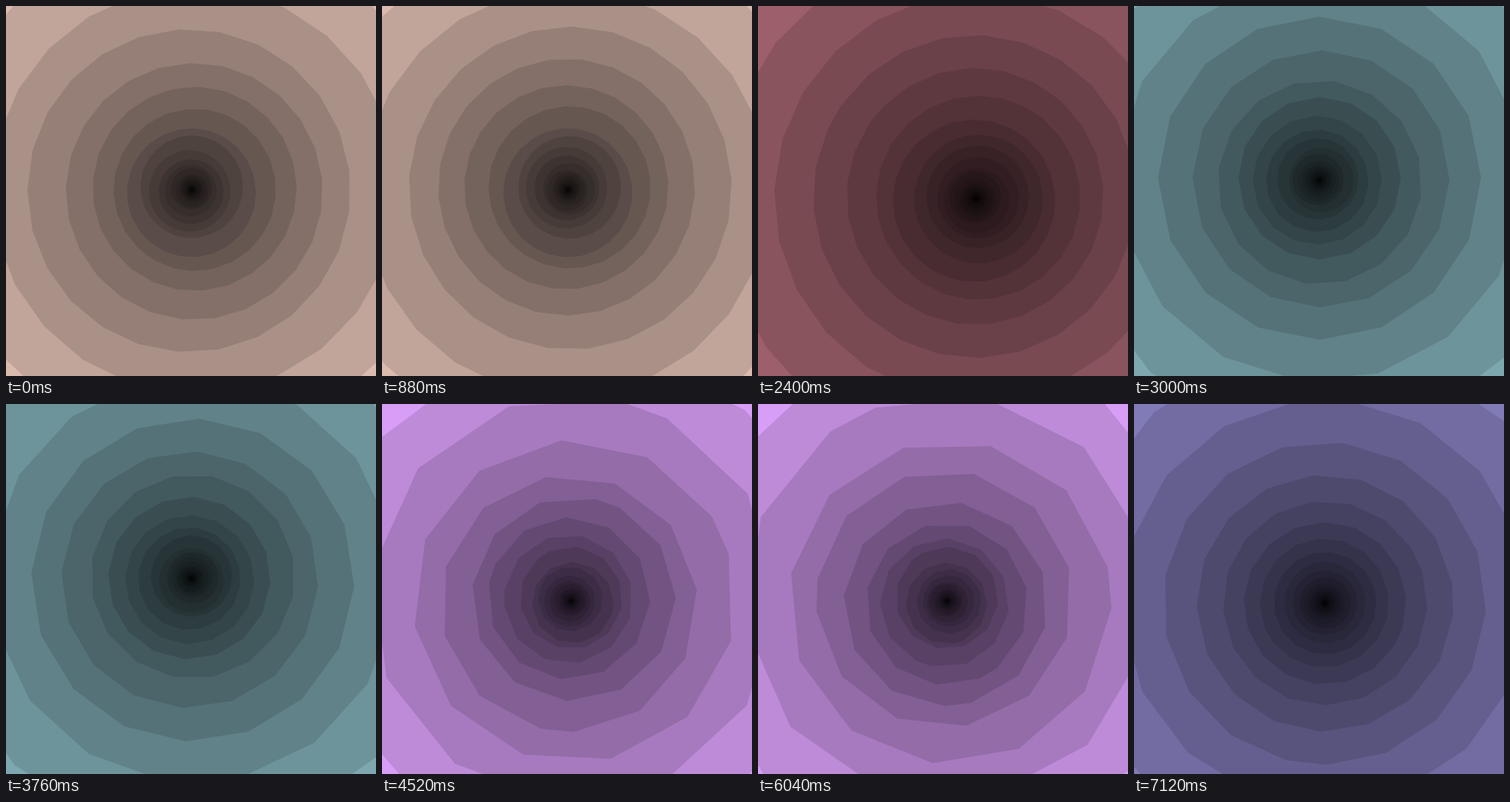
These frames come from a looping animation (450x450 px, 7240 ms). An HTML page with a canvas:

```html
<!DOCTYPE html>
<html lang="en">
<head>
<meta charset="utf-8">
<title>Tunnel</title>
<style>
  html, body { margin: 0; width: 100%; height: 100%; overflow: hidden; background: #000; }
  canvas { display: block; width: 450px; height: 450px; }
</style>
</head>
<body>
<canvas id="stage" width="450" height="450"></canvas>
<script>
const ctx = document.getElementById("stage").getContext("2d");
const RAD = Math.PI / 180;
const LOOP = 7240;
const RADIUS = 196.5;
const SHRINK = 0.795;
const DIM = 0.88;
const BEND = 74.4;

// Corner step in degrees; a step that does not divide 360 leaves one short side.
const scenes = [
  { from: 0,    color: [220, 187, 175], x: 226,   y: 223.5, step: 14.4, drift: 3.6 },
  { from: 1240, color: [157, 95, 107],  x: 265,   y: 234.5, step: 14.6, drift: 3.2 },
  { from: 2880, color: [125, 168, 176], x: 225.5, y: 212,   step: 22.5, drift: 2.6 },
  { from: 4520, color: [216, 158, 247], x: 230,   y: 239.5, step: 31.4, drift: 4 },
  { from: 6120, color: [129, 123, 184], x: 232,   y: 242,   step: 21.6, drift: 0.5 }
];

// Twist between neighbouring rings over time: [ms, degrees]
const twistKeys = [[0, -128], [880, -80.5], [3760, 90.9], [4520, 119.8], [6040, 187], [LOOP, 270]];

const longFrames = new Set([1, 3, 10, 17, 24, 32, 40, 47, 50]);
const shortFrames = new Set([2, 48]);
const starts = [];
for (let i = 0, t = 0; t < LOOP; i++) {
  starts.push(t);
  t += longFrames.has(i) ? 160 : shortFrames.has(i) ? 80 : 120;
}

function twistAt(t) {
  const i = Math.max(1, twistKeys.findIndex(key => key[0] >= t));
  const [t0, a0] = twistKeys[i - 1];
  const [t1, a1] = twistKeys[i];
  return a0 + (a1 - a0) * (t - t0) / (t1 - t0);
}

function shade(color, level) {
  return `rgb(${color.map(c => Math.round(c * DIM ** level)).join(",")})`;
}

function drawRing(scene, n, twist) {
  const phase = 105 + (11 + n) * twist + BEND * n * (n - 1) / 2;
  const radius = RADIUS * SHRINK ** n;
  const drift = Math.min(scene.drift, radius * 0.06);
  const lean = (phase + 26) * RAD;
  const x = scene.x + drift * Math.cos(lean);
  const y = scene.y + drift * Math.sin(lean);
  ctx.beginPath();
  for (let a = 0; a < 359.9; a += scene.step) {
    const angle = (phase + a) * RAD;
    ctx.lineTo(x + radius * Math.cos(angle), y + radius * Math.sin(angle));
  }
  ctx.closePath();
  ctx.fillStyle = shade(scene.color, n + 3);
  ctx.fill();
}

function draw(t) {
  const scene = scenes.findLast(s => s.from <= t);
  const twist = twistAt(t);
  ctx.fillStyle = shade(scene.color, 0);
  ctx.fillRect(0, 0, 450, 450);
  for (let n = -2; n < 24; n++) drawRing(scene, n, twist);
}

const origin = performance.now();
function tick() {
  const t = (performance.now() - origin) % LOOP;
  draw(starts.findLast(s => s <= t));
  requestAnimationFrame(tick);
}
tick();
</script>
</body>
</html>
```
